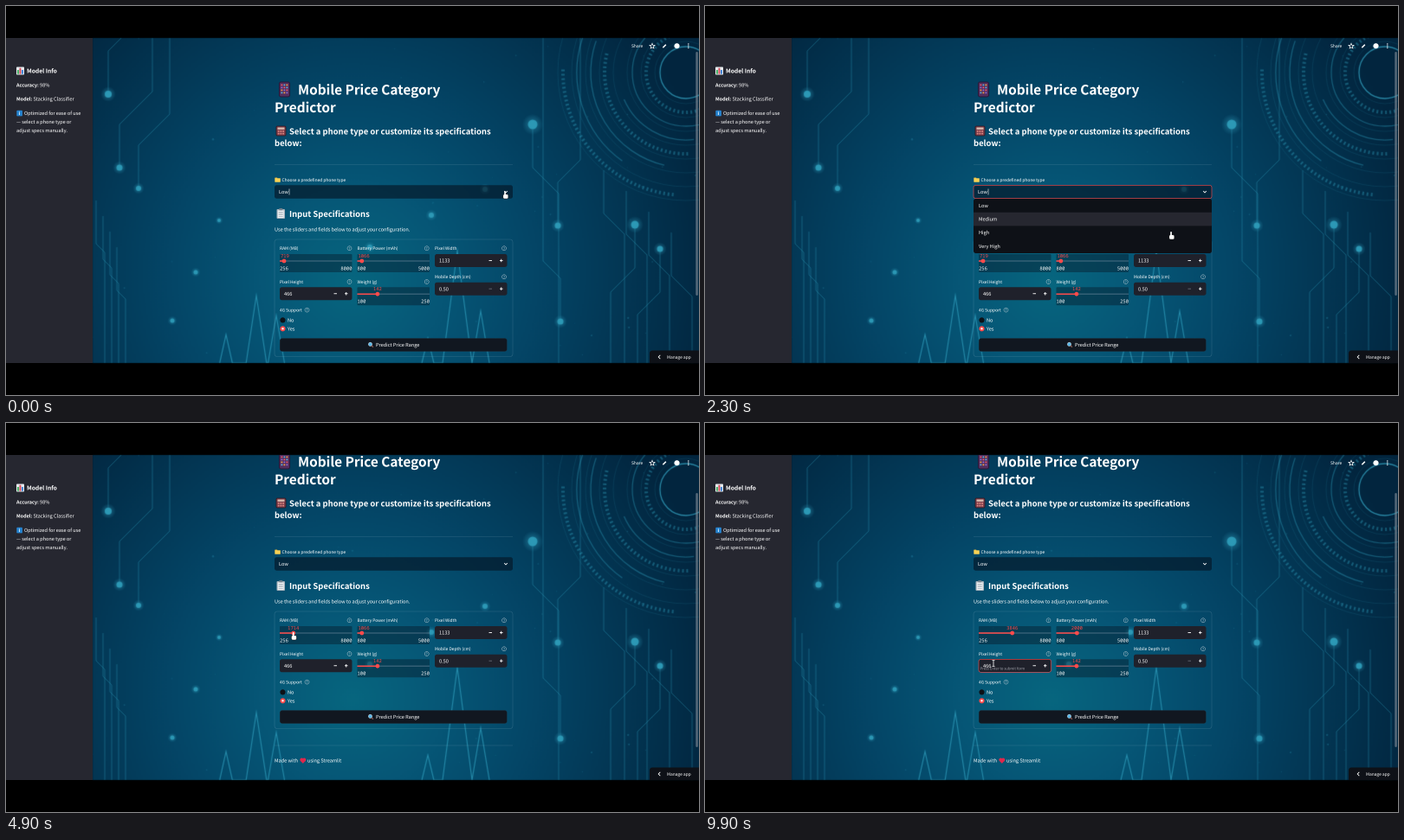
These frames come from a looping animation (800x450 px, 10000 ms). An HTML page with a canvas:

```html
<!DOCTYPE html>
<html lang="en">
<head>
<meta charset="utf-8">
<title>Mobile Price Category Predictor</title>
<style>
html, body { margin: 0; width: 100%; height: 100%; overflow: hidden; background: #000; }
canvas { display: block; width: 800px; height: 450px; }
</style>
</head>
<body>
<canvas id="stage" width="1600" height="900"></canvas>
<script>
const LOOP = 10000, TAU = Math.PI * 2, TOP = 37, BOTTOM = 413;
const SANS = '"Noto Sans CJK JP", "Noto Sans CJK SC", Lato, sans-serif';
const MONO = '"Noto Sans Mono", "DejaVu Sans Mono", monospace';
const RED = '#ff4b4b', PANEL = '#262730', INK = '#0e1117', WHITE = '#fff';
const BOLD = { weight: 700 };
const ctx = document.getElementById('stage').getContext('2d');
ctx.scale(2, 2); // double resolution keeps small text evenly spaced
let g = ctx;

// ---- drawing helpers ----
function line(points, color, width = 1, close = false) {
  g.beginPath();
  points.forEach(([x, y]) => g.lineTo(x, y));
  if (close) g.closePath();
  g.strokeStyle = color;
  g.lineWidth = width;
  g.stroke();
}
function dot(x, y, r, color) {
  g.beginPath();
  g.arc(x, y, r, 0, TAU);
  g.fillStyle = color;
  g.fill();
}
function arc(x, y, r, color, width = 1, from = 0, to = TAU) {
  g.beginPath();
  g.arc(x, y, r, from, to);
  g.strokeStyle = color;
  g.lineWidth = width;
  g.stroke();
}
function box(x, y, w, h, fill, r = 0, stroke, width = .6) {
  g.beginPath();
  g.roundRect(x, y, w, h, r);
  if (fill) { g.fillStyle = fill; g.fill(); }
  if (stroke) { g.strokeStyle = stroke; g.lineWidth = width; g.stroke(); }
}
// Returns the x where the text ends.
function text(str, x, y, size = 6.25, { color = WHITE, weight = 500, mono = false, align = 'left' } = {}) {
  g.font = `${weight} ${mono ? size : size / 1.117}px ${mono ? MONO : SANS}`;
  g.textRendering = 'geometricPrecision';
  g.textAlign = align;
  g.fillStyle = color;
  g.fillText(str, x, y);
  return x + g.measureText(str).width;
}

// ---- backdrop, drawn once ----
const teal = alpha => `rgba(52,165,195,${alpha})`;

// A circuit track: straight run, 45 degree jog, then straight on to the edge.
function track(x, y, jog, dir) {
  const turn = y + dir * 50;
  line([[x, y], [x, turn], [x + jog, turn + dir * Math.abs(jog)], [x + jog, dir < 0 ? TOP : BOTTOM]], teal(.38));
}
function node(x, y, r) {
  const halo = g.createRadialGradient(x, y, 0, x, y, r * 2.2);
  halo.addColorStop(0, teal(.55));
  halo.addColorStop(1, teal(0));
  dot(x, y, r * 2.2, halo);
  dot(x, y, r, '#2c98b5');
}
function heartbeat(peaks) {
  const points = peaks.flatMap(([x, h]) => {
    const half = 4 + h * .1;
    return [[x - half, BOTTOM], [x, BOTTOM - h], [x + half, BOTTOM]];
  });
  line(points, teal(.65), 1.2);
}
function dial(x, y, rand) {
  for (let i = 0; i < 8; i++) {
    const r = 30 + i * 16, from = i < 3 ? 0 : 1.3 + rand() * .9;
    g.setLineDash(i % 3 === 1 ? [2, 3] : []);
    arc(x, y, r, teal(i ? .4 : .75), i % 3 === 1 ? 4 : 1.3, from, i < 3 ? TAU : from + 1.2 + rand());
    g.setLineDash([]);
    arc(x, y, r + 6, teal(.2), .7);
  }
}

function makeBackdrop() {
  const layer = document.createElement('canvas');
  layer.width = 800;
  layer.height = 450;
  g = layer.getContext('2d');
  g.beginPath();
  g.rect(100, TOP, 700, BOTTOM - TOP);
  g.clip();
  const glow = g.createRadialGradient(400, 320, 0, 400, 300, 430);
  ['#07667f', '#065676', '#044566', '#033552', '#02253e'].forEach((c, i) => glow.addColorStop(i / 4, c));
  g.fillStyle = glow;
  g.fillRect(100, TOP, 700, BOTTOM - TOP);

  let seed = 7;
  const rand = () => (seed = seed * 16807 % 2147483647) / 2147483647;
  for (let i = 0; i < 60; i++)
    dot(100 + 700 * rand(), TOP + 376 * rand(), .4 + .8 * rand(), teal(.1 + .2 * rand()));

  // Side bundles running off the bottom edge
  for (let i = 0; i < 4; i++) {
    track(104 + i * 8, 225 + i * 18, 10, 1);
    track(690 + i * 26, 190 + i * 24, 24, 1);
  }
  // x, y, radius, jog and direction of the track (0: none)
  const nodes = [
    [118, 102, 4, 28, -1], [131, 187, 3.5, 38, -1], [153, 211, 3, 36, -1],
    [608, 137, 5.5, 30, 1], [637, 254, 3.5, 26, -1], [726, 253, 4.5, -28, 1],
    [755, 281, 3.5, -26, 1], [640, 365, 3.5, -20, -1],
    [219, 308, 2.5], [192, 364, 2.5], [246, 248, 2], [420, 279, 3], [491, 242, 3], [553, 212, 3]
  ];
  nodes.forEach(([x, y, r, jog, dir]) => {
    if (dir) track(x, y, jog, dir);
    node(x, y, r);
  });
  heartbeat([[254, 33], [289, 78], [312, 55]]);
  heartbeat([[487, 29], [521, 130], [548, 60]]);
  dial(785, 77, rand);
  g = ctx;
  return layer;
}

// ---- small icons ----
function help(x, y) {
  arc(x, y, 2.5, '#c9d3da', .5);
  text('?', x, y + 1.5, 4.2, { align: 'center', color: '#dfe5e9' });
}
function dotGrid(x, y, cols, rows, step, size, colors) {
  for (let i = 0; i < cols * rows; i++)
    box(x + i % cols * step, y + Math.floor(i / cols) * step, size, size, colors[i * 7 % colors.length], .4);
}
function phoneIcon(x, y) {
  box(x, y, 12, 17, '#54305f', 2, '#2b1738', 1);
  dotGrid(x + 2, y + 2.5, 3, 4, 3, 1.8, ['#ef5a6f', '#8f6bd8', '#f0a24a', '#59b6e0']);
}
function deviceIcon(x, y) {
  box(x, y, 11, 11, '#7b3f4c', 1.5, '#35171f', .8);
  box(x + 1.5, y + 1.5, 8, 2.4, '#d9b9ac', .4);
  dotGrid(x + 1.8, y + 5, 3, 2, 2.7, 1.8, ['#dd8580']);
}
function clipboardIcon(x, y) {
  box(x, y, 9.5, 11, '#a8b3bc', 1);
  box(x + 1.2, y + 1.5, 7, 8.5, '#eef2f4');
  box(x + 2.8, y - 1, 4, 2.4, '#70808c', .7);
  for (let i = 0; i < 4; i++) box(x + 2.2, y + 3 + i * 1.7, 5, .6, '#8b99a5');
}
function folderIcon(x, y) {
  box(x, y, 3, 2, '#e2b13c', .5);
  box(x, y + .8, 6.5, 4.4, '#f7d154', .6);
}
function lensIcon(x, y) {
  line([[x + 1, y + 1], [x + 3.4, y + 3.4]], '#8a5a52', 1.2);
  dot(x, y, 2.1, '#58b7ea');
  arc(x, y, 2.1, '#c4d2db', .6);
}
function heartIcon(x, y) {
  g.save();
  g.translate(x, y);
  g.rotate(TAU / 8);
  box(-2, -2, 4, 4, '#e0284c');
  dot(-2, 0, 2, '#e0284c');
  dot(0, -2, 2, '#e0284c');
  g.restore();
}
function chartIcon(x, y) {
  box(x, y, 9, 9, '#e6ebef', .8);
  ['#41ad60', '#d84a58', '#3c83d6'].forEach((c, i) => {
    const h = i === 1 ? 7 : 4.7;
    box(x + 1 + i * 2.5, y + 8.2 - h, 1.9, h, c);
  });
}

// ---- motion ----
const ease = p => p * p * (3 - 2 * p);
const progress = (t, from, to) => ease(Math.min(1, Math.max(0, (t - from) / (to - from))));
const mix = (a, b, p) => a + (b - a) * p;

const stops = [
  [0, 576, 214, 'hand'], [850, 534, 238, 'hand'], [2100, 537, 248, 'hand'], [2300, 538, 261, 'hand'],
  [2800, 500, 232, 'hand'], [3800, 377, 229, 'arrow'],
  [4600, 321, 242, 'hand'], [5400, 354.5, 242, 'hand'], [6100, 436, 245.5, 'arrow'],
  [6600, 411, 242, 'hand'], [7300, 429.5, 242, 'hand'],
  [7900, 525, 244, 'beam'], [9200, 333, 278, 'beam']
];
function pointer(t) {
  const next = stops.find(s => s[0] > t) || stops.at(-1);
  const last = stops.findLast(s => s[0] <= t) || stops[0];
  const p = next === last ? 0 : progress(t, last[0], next[0]);
  return { x: mix(last[1], next[1], p), y: mix(last[2], next[2], p), kind: (p < .5 ? last : next)[3] };
}
const pointers = {
  beam() {
    line([[0, -3.5], [0, 3.5]], WHITE, .8);
    for (const y of [-3.5, 3.5]) line([[-1.5, y], [1.5, y]], WHITE, .7);
  },
  hand() {
    box(-2.2, 3.8, 6, 5.2, WHITE, 1.6, '#111', .5);
    box(-.8, 0, 1.7, 6, WHITE, .8);
  },
  arrow() {
    const outline = [[0, 0], [0, 6.8], [1.9, 5.2], [4.7, 4.8]];
    line(outline, '#111', .8, true);
    g.fillStyle = WHITE;
    g.fill();
  }
};
function drawPointer(t) {
  const { x, y, kind } = pointer(t);
  g.save();
  g.translate(x, y);
  pointers[kind]();
  g.restore();
}

// ---- widgets ----
function label(str, x, y, helpX) {
  text(str, x, y + 1.9, 5.47);
  help(helpX, y);
}
function slider(x, y, value, min, max) {
  const knob = x + 83.5 * (value - min) / (max - min), shown = String(Math.round(value));
  box(x, y - 8, 83.5, 21, 'rgba(8,22,36,.42)', 1);
  line([[x, y], [x + 83.5, y]], 'rgba(120,145,165,.4)', 1.5);
  line([[x, y], [knob, y]], RED, 1.5);
  dot(knob, y, 2.4, RED);
  text(shown, Math.max(knob, x + shown.length * 1.64 + 1), y - 4, 5.47, { mono: true, color: RED, align: 'center' });
  text(min, x, y + 10.5, 5.47, { mono: true });
  text(max, x + 83.5, y + 10.5, 5.47, { mono: true, align: 'right' });
}
function numberField(x, y, value, minusColor = WHITE, border) {
  box(x, y, 83.5, 15, '#1f212b', 2.5, border);
  text(value, x + 5, y + 9.7);
  box(x + 62.5, y + 7, 3.5, .9, minusColor);
  box(x + 75, y + 7, 3.5, .9, WHITE);
  box(x + 76.3, y + 5.7, .9, 3.5, WHITE);
}
function radio(y, name, on) {
  dot(319.5, y, 3.1, on ? RED : INK);
  if (on) dot(319.5, y, 1.2, WHITE);
  text(name, 325, y + 2.2);
}
function rule(y) {
  line([[310, y], [585, y]], 'rgba(200,220,235,.2)', .6);
}

function drawHeading() {
  phoneIcon(315.5, 88);
  text('Mobile Price Category', 337, 102.5, 17.19, BOLD);
  text('Predictor', 310, 123, 17.19, BOLD);
  deviceIcon(312, 139);
  text('Select a phone type or customize its specifications', 327, 148.7, 10.55, BOLD);
  text('below:', 310, 161.8, 10.55, BOLD);
  rule(183.5);
}
function drawSelect(t, open) {
  folderIcon(310.3, 198.5);
  text('Choose a predefined phone type', 318.5, 203, 5.47);
  box(310, 207.3, 275, 15.4, 'rgba(5,25,40,.68)', 2.5, open && RED);
  text('Low', 315, 217.2);
  if (t < 2850 && t % 1000 < 500) box(326.7, 211.5, .6, 7, WHITE);
  line([[575.2, 214.1], [577, 215.9], [578.8, 214.1]], WHITE, .9);
}
function drawOptions(t) {
  const height = 15.6, hovered = (pointer(Math.max(0, t - 150)).y - 223) / height;
  box(310, 223, 275, 63, INK, 2.5);
  box(310, 223.2 + Math.max(0, Math.floor(hovered)) * height, 275, height, PANEL);
  ['Low', 'Medium', 'High', 'Very High'].forEach((name, i) => text(name, 316, 233 + i * height));
}
function drawInputs(t) {
  clipboardIcon(312.5, 235);
  text('Input Specifications', 327, 244, 10.55, BOLD);
  text('Use the sliders and fields below to adjust your configuration.', 310, 260.6);
  box(310, 270, 275, 135.5, null, 3, 'rgba(200,220,235,.2)');

  label('RAM (MB)', 316, 280.3, 396.5);
  slider(316, 295, mix(719, 3846, progress(t, 4600, 5400)), 256, 8000);
  label('Battery Power (mAh)', 405.5, 280.3, 485.7);
  slider(405.5, 295, mix(1066, 2000, progress(t, 6600, 7300)), 800, 5000);
  label('Pixel Width', 495, 280.3, 575);
  numberField(495, 287, '1133');

  const editing = t > 9300;
  label('Pixel Height', 316, 319, 396.5);
  numberField(316, 325.3, '466', WHITE, editing && RED);
  if (editing) text('Press Enter to submit form', 317.5, 337.5, 4.7, { color: '#a3a5ad' });
  label('Weight (g)', 405.5, 319, 485.7);
  slider(405.5, 333.2, 142, 100, 250);
  label('Mobile Depth (cm)', 495, 313.3, 575);
  numberField(495, 319.7, '0.50', '#666975');

  label('4G Support', 316, 351.6, 347.5);
  radio(363.4, 'No', false);
  radio(373.3, 'Yes', true);

  box(316.3, 384.5, 262, 15, '#111720', 2.5, '#202c38', .4);
  lensIcon(420.5, 391.3);
  text('Predict Price Range', 427, 394.2);
}
function drawFooter() {
  rule(425);
  text('Made with', 310, 444.6);
  heartIcon(342.8, 443);
  text('using Streamlit', 348, 444.6);
}

function drawSidebar() {
  box(0, TOP, 100, BOTTOM - TOP, PANEL);
  chartIcon(12, 70.5);
  text('Model Info', 24, 77.6, 7.5, BOLD);
  text(' 98%', text('Accuracy:', 12, 93.4, 6.1, BOLD), 93.4);
  text(' Stacking Classifier', text('Model:', 12, 109.6, 6.1, BOLD), 109.6);
  box(12.3, 120.8, 6.6, 6.6, '#2583cf', .8);
  text('i', 15.6, 126.2, 5.8, { weight: 700, align: 'center' });
  text('Optimized for ease of use', 21, 126);
  text('— select a phone type or', 12, 136.1);
  text('adjust specs manually.', 12, 146.1);
}

function drawChrome(scrolled) {
  text('Share', 722, 48, 5.47);
  const star = Array.from({ length: 10 }, (_, i) => {
    const a = i * Math.PI / 5 - Math.PI / 2, r = i % 2 ? 1.4 : 3.2;
    return [746 + r * Math.cos(a), 46.4 + r * Math.sin(a)];
  });
  line(star, WHITE, .7, true);
  line([[758.3, 48.2], [761.8, 44.7]], WHITE, 1.5);
  dot(774.5, 46.2, 3.1, WHITE);
  for (const d of [-2.2, 0, 2.2]) dot(787.8, 46.2 + d, .7, WHITE);

  box(796.3, mix(53, 81, scrolled), 2.5, mix(282, 294, scrolled), 'rgba(140,150,160,.6)', 1.2);
  box(743, 398.5, 57, 14.5, INK, [3, 0, 0, 0]);
  line([[755.3, 403.8], [753.2, 406], [755.3, 408.2]], WHITE, .9);
  text('Manage app', 763, 407.9, 5.47);
}

const backdrop = makeBackdrop();

function draw(t) {
  const scrolled = progress(t, 3000, 3500), open = t > 400 && t < 2850;
  g.fillStyle = '#000';
  g.fillRect(0, 0, 800, 450);
  g.drawImage(backdrop, 0, 0);
  g.save();
  g.beginPath();
  g.rect(100, TOP, 700, BOTTOM - TOP);
  g.clip();
  g.translate(0, -52 * scrolled);
  drawHeading();
  drawSelect(t, open);
  drawInputs(t);
  drawFooter();
  if (open) drawOptions(t);
  g.restore();
  drawSidebar();
  drawChrome(scrolled);
  drawPointer(t);
}

const start = performance.now();
function tick() {
  draw((performance.now() - start) % LOOP);
  requestAnimationFrame(tick);
}
tick();
</script>
</body>
</html>
```
